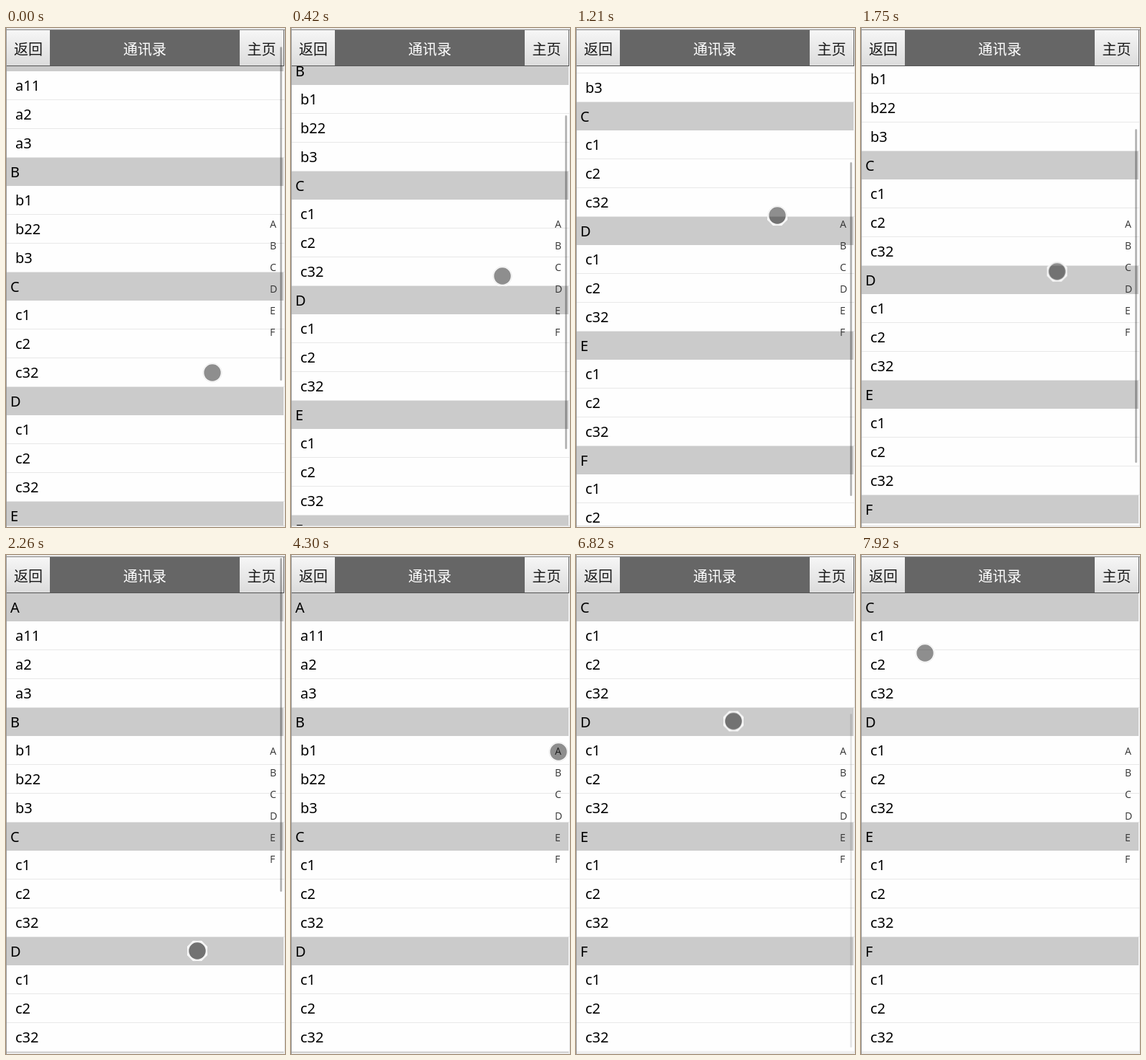
Recreate the animation shown at these times as an HTML page. Size 388 px wide and 692 px high, loop 8 s.

```html
<!DOCTYPE html>
<html lang="zh-CN">
<head>
<meta charset="utf-8">
<title>通讯录</title>
<style>
  @property --y { syntax: "<length>"; inherits: true; initial-value: 0px; }

  html, body { margin: 0; width: 100%; height: 100%; overflow: hidden; background: #fefefe; }
  #stage { position: relative; width: 388px; height: 692px; overflow: hidden; color: #000;
    font: 20px/39px "Noto Sans", "Noto Sans CJK SC", sans-serif; }
  #stage div, #stage svg { position: absolute; box-sizing: border-box; }

  #view { left: 1px; top: 53px; width: 386px; height: 637px; overflow: hidden; }
  #list { left: 0; top: calc(-1 * var(--y)); width: 386px; }
  #stage #list div { position: static; }
  #list .head { width: 385px; height: 39px; background: #cbcbcb; padding-left: 5px; }
  #list .item { height: 40px; line-height: 40px; border-bottom: 1px solid #e8e8e8; padding-left: 12px; }

  #top { left: 0; top: 0; width: 388px; height: 3px; background: #e9e9e9; border-bottom: 1px solid #888; }
  #bar { left: 1px; top: 3px; width: 386px; height: 50px; background: #666; padding-right: 1px;
    border: solid #555; border-width: 0 1px 1px 0; color: #fff; text-align: center;
    font: 20px/51px "Noto Sans CJK SC", sans-serif; }
  #bar div { top: 0; height: 49px; color: #1a1a1a; background: linear-gradient(#f6f6f6, #dcdcdc); }
  #bar .back { left: 0; width: 60px; }
  #bar .home { right: 0; width: 61px; }

  #index { left: 367px; top: 257px; width: 16px; font: 14px/30px "Open Sans", sans-serif; color: #333; }
  #stage #index div { position: static; }
  #thumb { left: 381px; top: calc(4px + .68 * var(--y)); width: 3px; height: 463px;
    border-radius: 2px; background: rgba(0, 0, 0, .28); }
  #left { left: 0; top: 0; width: 1px; height: 692px; background: #999; }
  #right { left: 387px; top: 53px; width: 1px; height: 639px; background: #e2e2e2; }
  #foot { left: 1px; top: 690px; width: 387px; height: 2px; background: #f4f4f4; border-top: 1px solid #dedede; }
  #touch { left: -14px; top: -14px; }

  /* Each segment moves in a few hard steps; the default holds until the next key. */
  #stage, #thumb, #touch { animation: 8s steps(1) -10ms infinite; }
  #stage { animation-name: scroll; }
  #thumb { animation-name: fade; }
  #touch { animation-name: finger; }

  @keyframes scroll {
    0% { --y: 32px; animation-timing-function: steps(3); }
    5.25% { --y: 172px; animation-timing-function: steps(6); }
    15.125% { --y: 268px; animation-timing-function: steps(2); }
    18.25% { --y: 300px; animation-timing-function: steps(6); }
    28.25% { --y: 0px; }
    67.375% { --y: 159px; }
    79.625%, 100% { --y: 318px; }
  }
  @keyframes fade {
    0% { opacity: 1; }
    29.75% { opacity: 1; animation-timing-function: steps(3); }
    34.25% { opacity: 0; }
    79.625% { opacity: 1; animation-timing-function: steps(3); }
    86.875%, 100% { opacity: 0; }
  }
  @keyframes finger {
    0% { transform: translate(287px, 478px); animation-timing-function: steps(3); }
    5.25% { transform: translate(294px, 344px); animation-timing-function: steps(6); }
    15.125% { transform: translate(280px, 260px); animation-timing-function: steps(2); }
    18.25% { transform: translate(276px, 232px); animation-timing-function: steps(6); }
    28.25% { transform: translate(266px, 549px); animation-timing-function: steps(4); }
    34.25% { transform: translate(266px, 573px); }
    42.875% { transform: translate(269px, 503px); }
    44.625% { transform: translate(271px, 358px); }
    46.625% { transform: translate(307px, 291px); animation-timing-function: steps(4); }
    53.75% { transform: translate(372px, 273px); }
    60.875% { transform: translate(372px, 280px); animation-timing-function: steps(4); }
    67.375% { transform: translate(372px, 308px); }
    72.875% { transform: translate(372px, 321px); animation-timing-function: steps(2); }
    76.125% { transform: translate(372px, 340px); }
    83.5% { transform: translate(341px, 265px); animation-timing-function: steps(2); }
    86.875% { transform: translate(97px, 196px); animation-timing-function: steps(3); }
    92.5% { transform: translate(30px, 118px); animation-timing-function: steps(4); }
    99%, 100% { transform: translate(89px, 136px); }
  }
</style>
</head>
<body>
<div id="stage">
  <div id="view"><div id="list"></div></div>
  <div id="top"></div>
  <div id="bar">通讯录<div class="back">返回</div><div class="home">主页</div></div>
  <div id="left"></div><div id="right"></div><div id="foot"></div>
  <div id="index"></div>
  <div id="thumb"></div>
  <svg id="touch" width="28" height="28" viewBox="-14 -14 28 28">
    <path fill="#fff" fill-rule="evenodd"
      d="M-6-14H6L14-6V6L6 14H-6L-14 6V-6ZM-11.7 0a11.7 11.7 0 1 0 23.4 0a11.7 11.7 0 1 0-23.4 0Z"/>
    <circle r="11.7" fill="rgba(0,0,0,.44)"/>
    <circle r="13.2" fill="none" stroke="#ddd" stroke-width=".6"/>
  </svg>
</div>
<script>
  const list = document.getElementById('list');
  const index = document.getElementById('index');

  function add(parent, text, cls = '') {
    const el = document.createElement('div');
    el.textContent = text;
    el.className = cls;
    parent.append(el);
  }

  const names = { A: ['a11', 'a2', 'a3'], B: ['b1', 'b22', 'b3'] };
  for (const letter of 'ABCDEF') {
    add(list, letter, 'head');
    for (const name of names[letter] || ['c1', 'c2', 'c32']) add(list, name, 'item');
    add(index, letter);
  }
</script>
</body>
</html>
```
